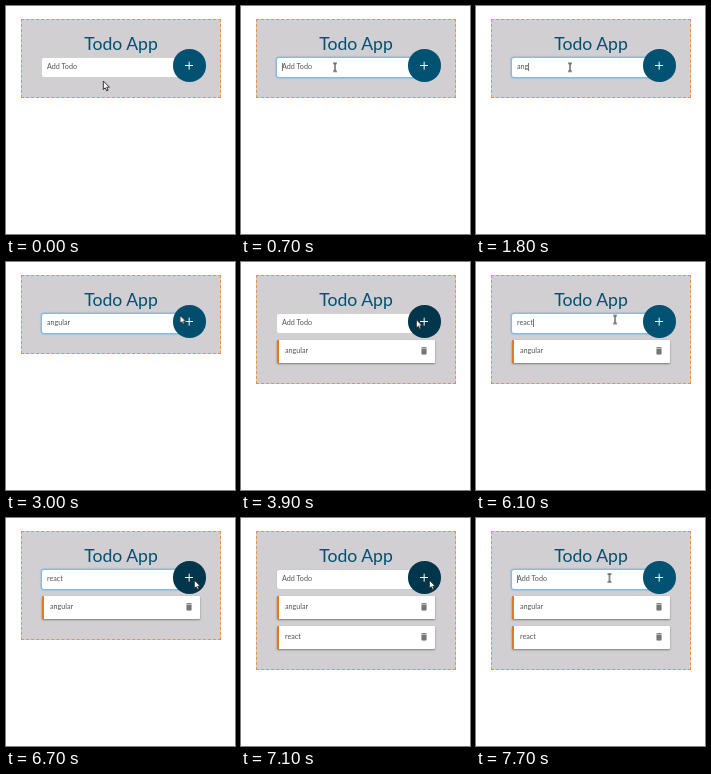
An HTML page that plays this animation: 229 px wide and 228 px high, repeating every 8000 ms.

```html
<!DOCTYPE html>
<html lang="en">
<head>
<meta charset="utf-8">
<title>Todo App</title>
<style>
  :root { --teal: #005172; --deep: #00364b; --orange: #e07a1c; }
  html, body { margin: 0; width: 100%; height: 100%; overflow: hidden; background: #fff; }
  body { position: relative; font: 7.2px/10px Lato, sans-serif; color: #555; }
  body *, .typed::before { box-sizing: border-box; animation: 8s step-end infinite; }
  body > *, .panel > *, .pointer > * { position: absolute; }

  .panel {
    left: 15px; top: 13px; width: 200px; height: 79px;
    background: #d1cfd1; border: 1px dashed #e8923c;
    animation-name: grow;
  }
  h1 {
    left: 0; top: 25px; width: 230px; margin: 0; text-align: center;
    font: 400 17.6px/26px Lato, sans-serif; color: var(--teal);
  }

  .field {
    left: 36px; top: 51.5px; width: 146px; height: 19.5px; padding: 4.5px 0 0 5px;
    background: #fff; border-radius: 2px; white-space: pre;
    animation-name: focus; animation-timing-function: linear;
  }
  .typed::before { content: "Add Todo"; animation-name: type; }
  .caret {
    display: inline-block; width: 1px; height: 8px; margin-right: -1px;
    vertical-align: -1.5px; background: #777; visibility: hidden;
    animation-name: blink;
  }
  .start { position: absolute; left: 5px; top: 5.5px; animation-name: blink-start; }

  .item {
    left: 35.5px; width: 158.5px; height: 23px; padding: 6.5px 0 0 6.5px;
    background: #fff; border-left: 2px solid var(--orange); border-radius: 1px;
    box-shadow: 0 1px 2px rgba(0, 0, 0, .4); visibility: hidden;
  }
  .first { top: 77.5px; animation-name: add-first; }
  .second { top: 107.5px; animation-name: add-second; }
  .item svg { position: absolute; left: 142px; top: 7.8px; width: 6px; height: 7.7px; fill: #757575; }

  .button {
    left: 167px; top: 43px; width: 32.6px; height: 32.6px; border-radius: 50%;
    background: var(--teal);
    animation-name: hover; animation-timing-function: linear;
  }
  .button::before, .button::after {
    content: ""; position: absolute; left: 12.4px; top: 15.7px;
    width: 8px; height: 1.3px; background: #fff;
  }
  .button::after { transform: rotate(90deg); }

  .pointer { left: 0; top: 0; animation-name: move; animation-timing-function: ease-in-out; }
  .pointer svg { overflow: visible; width: 8px; height: 11px; left: 0; top: 0; }
  .arrow { animation-name: arrow; }
  .beam { visibility: hidden; animation-name: beam; }

  @keyframes grow {
    0% { height: 79px; }
    41.25% { height: 109px; }
    87.5%, 100% { height: 139px; }
  }
  @keyframes focus {
    0%, 6.2%, 43.75%, 53.7%, 90%, 94.9% { box-shadow: 0 0 0 0 rgba(125, 182, 228, 0); }
    8.75%, 40%, 56.2%, 86.2%, 96.2%, 100% { box-shadow: 0 0 1px 1.4px rgba(125, 182, 228, .95); }
  }
  @keyframes type {
    0% { content: "Add Todo"; }
    16.25% { content: "a"; }
    18.75% { content: "an"; }
    22.5% { content: "ang"; }
    25% { content: "angu"; }
    27.5% { content: "angul"; }
    28.75% { content: "angula"; }
    31.25% { content: "angular"; }
    41.25% { content: "Add Todo"; }
    63.75% { content: "r"; }
    66.25% { content: "re"; }
    67.5% { content: "rea"; }
    68.75% { content: "reac"; }
    73.75% { content: "react"; }
    87.5%, 100% { content: "Add Todo"; }
  }
  @keyframes blink {
    0% { visibility: hidden; }
    16.25% { visibility: visible; }
    37.5% { visibility: hidden; }
    63.75% { visibility: visible; }
    80%, 100% { visibility: hidden; }
  }
  @keyframes blink-start {
    0% { visibility: hidden; }
    6.25% { visibility: visible; }
    12.5% { visibility: hidden; }
    55% { visibility: visible; }
    61.25% { visibility: hidden; }
    95%, 100% { visibility: visible; }
  }
  @keyframes add-first {
    0% { visibility: hidden; }
    41.25%, 100% { visibility: visible; }
  }
  @keyframes add-second {
    0% { visibility: hidden; }
    87.5%, 100% { visibility: visible; }
  }
  @keyframes hover {
    0%, 37%, 54.5%, 80%, 94%, 100% { background: var(--teal); }
    41.25%, 50%, 83%, 90% { background: var(--deep); }
  }
  @keyframes move {
    0%, 1% { transform: translate(97px, 75px); }
    3.75%, 35% { transform: translate(94px, 61.3px); }
    37.5% { transform: translate(173.5px, 53px); }
    41.25%, 49% { transform: translate(175px, 57.5px); }
    54%, 76.2% { transform: translate(139px, 57.5px); }
    82.5%, 88.7% { transform: translate(188px, 62px); }
    94%, 100% { transform: translate(133.5px, 60px); }
  }
  @keyframes arrow {
    0% { visibility: visible; }
    2.5% { visibility: hidden; }
    36.25% { visibility: visible; }
    51.5% { visibility: hidden; }
    79.5% { visibility: visible; }
    91.5%, 100% { visibility: hidden; }
  }
  @keyframes beam {
    0% { visibility: hidden; }
    2.5% { visibility: visible; }
    36.25% { visibility: hidden; }
    51.5% { visibility: visible; }
    79.5% { visibility: hidden; }
    91.5%, 100% { visibility: visible; }
  }
</style>
</head>
<body>
  <svg width="0" height="0"><symbol id="bin" viewBox="0 0 14 18"><path d="M1 16a2 2 0 0 0 2 2h8a2 2 0 0 0 2-2V4H1zM14 1h-3.500l-1-1h-5l-1 1H0v2h14z"/></symbol></svg>
  <div class="panel"></div>
  <h1>Todo App</h1>
  <div class="field"><i class="caret start"></i><span class="typed"></span><i class="caret"></i></div>
  <div class="item first">angular<svg><use href="#bin"/></svg></div>
  <div class="item second">react<svg><use href="#bin"/></svg></div>
  <div class="button"></div>
  <div class="pointer">
    <svg class="arrow"><path d="M.3 0V8.500L2.300 6.800 3.700 9.800 5.100 9.200 3.800 6.200H6.400z" fill="#fff" stroke="#222" stroke-width=".9"/></svg>
    <svg class="beam"><path d="M-2-4H-.6L0-3.500.6-4H2M0-3.500V3.500M-2 4H-.6L0 3.500.6 4H2" fill="none" stroke="#333" stroke-width="1.100"/></svg>
  </div>
</body>
</html>
```
